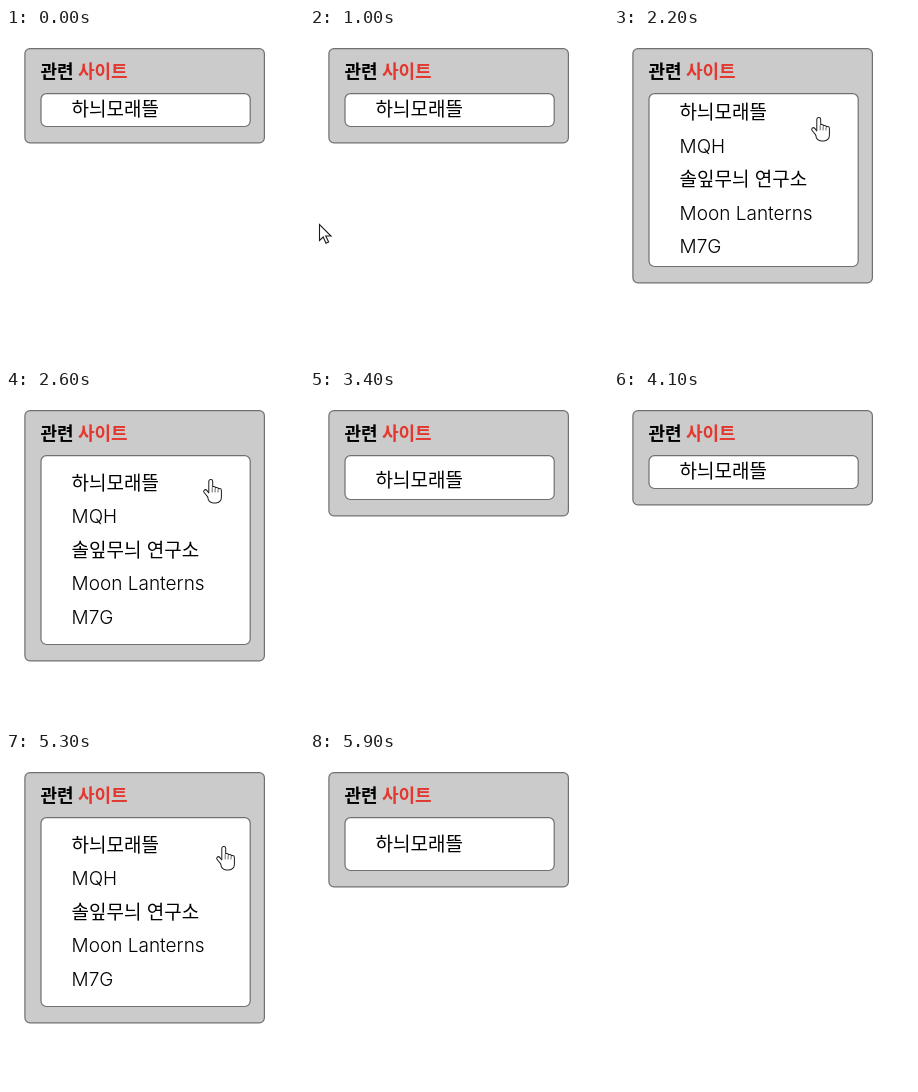
An HTML page with a canvas that plays this animation: 298x334 px, repeating every 6 s.

```html
<!DOCTYPE html>
<html lang="ko">
<head>
<meta charset="utf-8">
<style>
  html, body { margin: 0; width: 100%; height: 100%; overflow: hidden; background: #fff; }
  canvas { display: block; width: 298px; height: 334px; }
</style>
</head>
<body>
<canvas id="stage" width="298" height="334"></canvas>
<script>
const ctx = document.getElementById('stage').getContext('2d', { alpha: false });
const LOOP = 6000, STEP = 100, FADE = 500;
const OPEN_LAG = 213, CLOSE_LAG = 245;   // padding follows the height
const GROWTH = 156, PADDING = 12, ROW = 33.4;
const FAMILY = 'Inter, "Noto Sans CJK KR", "Noto Sans CJK", sans-serif';
const ITEMS = ['하늬모래뜰', 'MQH', '솔잎무늬 연구소', 'Moon Lanterns', 'M7G'];

// Each visit: menu opens and closes; the cursor passes key points, then vanishes
const VISITS = [
  { open: 1890, close: 3060, gone: 3100, points: [
    { at: 1000, x: 9, y: 196 }, { at: 1600, x: 254, y: 124 }, { at: 2100, x: 197, y: 89 }] },
  { open: 4327, close: 5610, gone: 5800, points: [
    { at: 4300, x: 260, y: 98 }, { at: 4500, x: 210, y: 94 },
    { at: 5500, x: 210, y: 94 }, { at: 5700, x: 286, y: 94 }] }
];

// CSS "ease": cubic-bezier(.25, .1, .25, 1)
function ease(x) {
  if (x <= 0) return 0;
  if (x >= 1) return 1;
  const curve = (s, a, b) => 3 * a * s * (1 - s) ** 2 + 3 * b * s * s * (1 - s) + s ** 3;
  let lo = 0, hi = 1;
  for (let i = 0; i < 24; i++) {
    const mid = (lo + hi) / 2;
    if (curve(mid, .25, .25) < x) lo = mid; else hi = mid;
  }
  return curve(lo, .1, 1);
}

function openness(t, openLag = 0, closeLag = 0) {
  return VISITS.reduce((sum, v) => sum
    + ease((t - v.open - openLag) / FADE)
    - ease((t - v.close - closeLag) / FADE), 0);
}

function pointAt(points, t) {
  const next = points.findIndex(p => p.at > t);
  if (next < 0) return points[points.length - 1];
  const a = points[next - 1], b = points[next];
  const k = (t - a.at) / (b.at - a.at);
  return { x: Math.round(a.x + (b.x - a.x) * k), y: Math.round(a.y + (b.y - a.y) * k) };
}

function box(left, top, right, bottom, radius, fill) {
  ctx.beginPath();
  ctx.roundRect(left, top, right - left, bottom - top, radius);
  ctx.fillStyle = fill;
  ctx.fill();
  ctx.strokeStyle = '#707070';
  ctx.lineWidth = 1.2;
  ctx.stroke();
}

function label(text, x, y, font, color) {
  ctx.font = font + ' ' + FAMILY;
  ctx.fillStyle = color;
  ctx.fillText(text, x, y);
}

function drawArrow() {
  const shape = new Path2D('M.5 .5V16.5L4.2 13L7 19.2L9.6 18L6.8 12H12Z');
  ctx.lineWidth = 1.1;
  ctx.fill(shape);
  ctx.stroke(shape);
}

function drawHand() {
  const shape = new Path2D();
  for (let i = 0; i < 4; i++) {
    const top = i ? 7 + i : 1;
    shape.roundRect(6.3 + 2.9 * i, top, 2.9, 18 - top, 1.4);
  }
  shape.roundRect(5.4, 13.5, 12.5, 10, [2, 1, 5, 5]);
  const thumb = new Path2D('M2.4 12.4L7.5 18.5');
  ctx.lineCap = 'round';
  ctx.lineWidth = 4.4;
  ctx.stroke(thumb);
  ctx.lineWidth = 2;
  ctx.stroke(shape);
  ctx.fill(shape);
  ctx.lineWidth = 2.4;
  ctx.strokeStyle = '#fff';
  ctx.stroke(thumb);
  ctx.strokeStyle = '#444';
  ctx.lineWidth = .8;
  ctx.stroke(new Path2D('M9.2 9V13M12.1 10V13M15 11V13'));
}

function drawCursor(t) {
  const visit = VISITS.find(v => t >= v.points[0].at && t < v.gone);
  if (!visit) return;
  const { x, y } = pointAt(visit.points, t);
  ctx.save();
  ctx.translate(x, y);
  ctx.fillStyle = '#fff';
  ctx.strokeStyle = '#1c1c1c';
  if (t >= visit.open) drawHand(); else drawArrow();
  ctx.restore();
}

function draw(t) {
  const grow = Math.round(GROWTH * openness(t));
  const shift = PADDING * openness(t, OPEN_LAG, CLOSE_LAG);

  ctx.fillStyle = '#fff';
  ctx.fillRect(0, 0, 298, 334);
  box(18.9, 20.7, 258.4, 114.8 + grow, 5, '#cbcbcb');
  label('관련', 34.4, 50, 'bold 18px', '#000');
  label('사이트', 71.9, 50, 'bold 18px', '#e2382f');
  box(35, 65.6, 244.2, 98.5 + grow, 5.5, '#fff');

  // Rows stay inside the padding, but the first one is always whole
  ctx.save();
  ctx.beginPath();
  ctx.rect(36, 66, 208, 32 + Math.max(shift, grow - shift));
  ctx.clip();
  ITEMS.forEach((item, i) =>
    label(item, 65.6, Math.round(88 + shift + i * ROW), '350 19px', '#000'));
  ctx.restore();
  drawCursor(t);
}

function tick() {
  const t = performance.now() % LOOP;
  draw(Math.floor(t / STEP) * STEP);
  requestAnimationFrame(tick);
}
tick();
</script>
</body>
</html>
```
